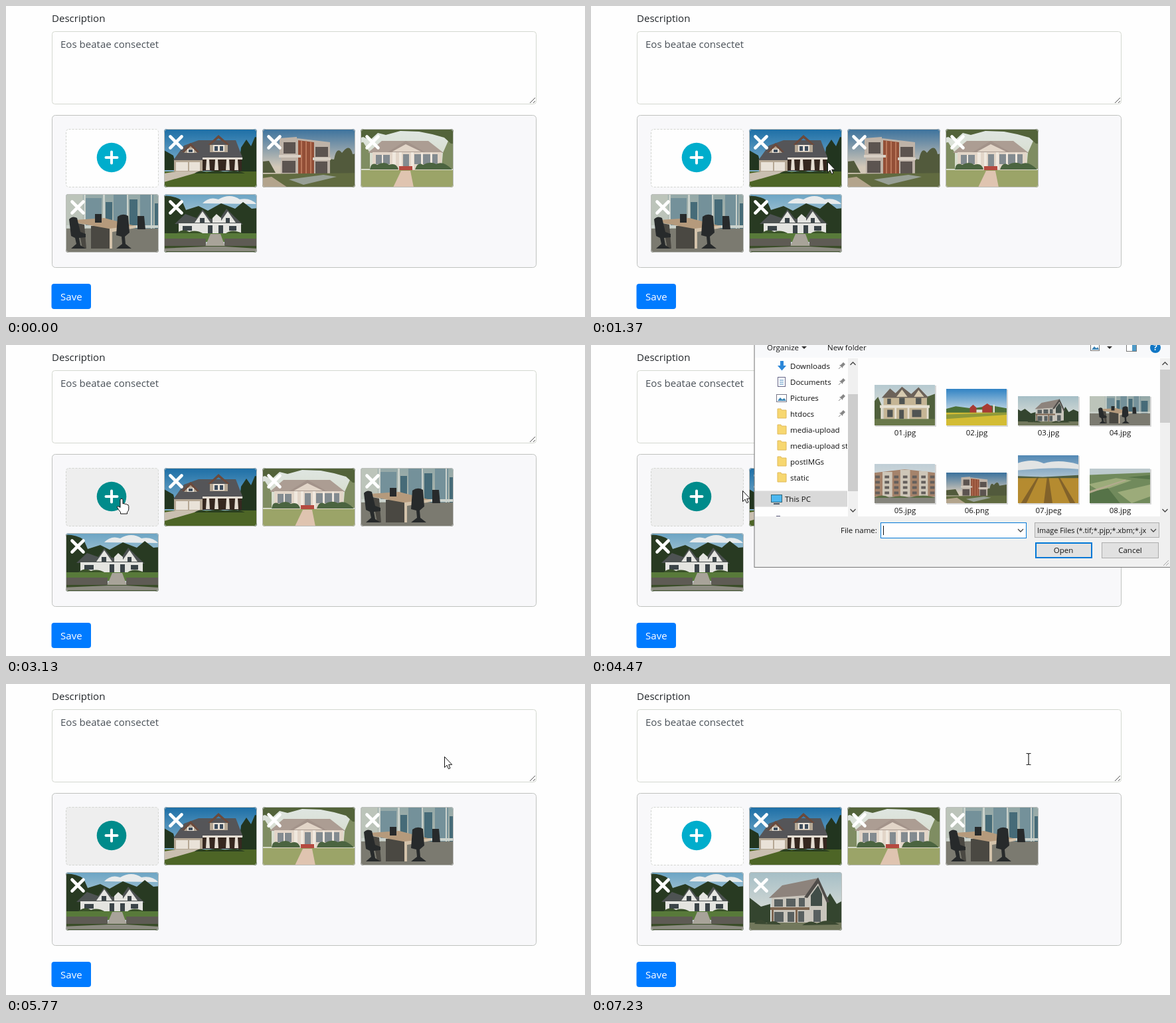
Animation, 872 px wide and 468 px high, one loop 7260 ms. Source, as an HTML page:

```html
<!DOCTYPE html>
<html lang="en">
<head>
<meta charset="utf-8">
<title>Media upload</title>
<style>
html, body { margin: 0; width: 100%; height: 100%; overflow: hidden; background: #fefefe; }
svg { display: block; }
#stage { width: 872px; height: 468px; }
text { font: 15.05px "Open Sans", "Noto Sans", sans-serif; fill: #212529; white-space: pre; }
#dialog text { font-size: 11.5px; fill: #111; }
#dialog .filter { font-size: 10.9px; }
</style>
</head>
<body>
<svg id="stage" viewBox="0 0 872 468" xmlns="http://www.w3.org/2000/svg">
  <defs id="defs">
    <clipPath id="round"><rect width="140" height="88" rx="4"/></clipPath>
    <clipPath id="side"><rect x="247" y="20" width="139" height="238"/></clipPath>
    <clipPath id="type"><rect x="668" y="267" width="168" height="24"/></clipPath>
  </defs>
  <rect width="872" height="468" fill="#fefefe"/>
  <text x="69" y="24">Description</text>
  <rect x="69.5" y="38.5" width="729" height="109" rx="4" fill="#fefefe" stroke="#d4d8d0"/>
  <text x="82" y="63" style="fill:#495057">Eos beatae consectet</text>
  <path d="M789 146l8-8M794 146l3-3" stroke="#555"/>
  <rect x="69.5" y="164.5" width="729" height="229" rx="5" fill="#f8f8fa" stroke="#bfc2bf"/>
  <g id="tiles"></g>
  <g id="loader" fill="#007db2"></g>
  <rect x="68.5" y="418" width="59.5" height="38" rx="4" fill="#007bff"/>
  <text x="82" y="443" style="fill:#fff">Save</text>
  <g id="dialog"></g>
  <g id="cursor">
    <path id="arrow" d="M.5.5V16.6L4.1 13.2 6.5 18.7 9 17.6 6.7 12.3H11.7Z" fill="#fff" stroke="#111"/>
    <path id="hand" d="M-2 1.5Q0-1.5 2 1.5V8Q4 6.6 5.2 8.6 7 7.4 8.2 9.4 10.5 8.6 10.8 11.5V16Q10.5 19 8.5 20.5V23H-1.5V20.5Q-5 16.5-6.6 13.3-6.5 10-2 13.5Z" fill="#fff" stroke="#111"/>
    <path id="beam" d="M-3.5-8.5H-1L0-7.5 1-8.5H3.5M0-7.5V7.5M-3.5 8.5H-1L0 7.5 1 8.5H3.5" fill="none" stroke="#222" stroke-width="1.2"/>
  </g>
</svg>
<script>
const LOOP = 7260;
const $ = id => document.getElementById(id);
const rect = (x, y, w, h, fill, extra = '') =>
  `<rect x="${x}" y="${y}" width="${w}" height="${h}" fill="${fill}" ${extra}/>`;
const path = (d, fill, extra = '') => `<path d="${d}" fill="${fill}" ${extra}/>`;
const line = (d, color, width = 1) => path(d, 'none', `stroke="${color}" stroke-width="${width}"`);
const label = (x, y, s, extra = '') => `<text x="${x}" y="${y}" ${extra}>${s}</text>`;
const clamp = v => Math.max(0, Math.min(1, v));
const smooth = v => { v = clamp(v); return v * v * (3 - 2 * v); };

// Each scene: sky colours, then [fill, path] layers in a box 88 high centred on x = 70.
const scenes = {
  gabled: ['#1c6ea6', '#7fb0cc', [
    ['#22351f', 'M-30 42L0 32 14 40 20 62H-30ZM112 62L116 28 124 16 131 26 137 12 170 20V64H112Z'],
    ['#555558', 'M14 47L30 25 52 17H108L119 45 62 47Z'],
    ['#b5a794', 'M15 47H58V64H15ZM30 36L40 25 50 36ZM69 24H96V35H69Z'],
    ['#6b4a3c', 'M27 35L40 21 53 35 50 35 40 26 30 35ZM66 24L82 9 99 24 95 24 82 14 70 24Z'],
    ['#e9e2d8', 'M18 50H36V63H18ZM38 50H54V63H38ZM35 30H45V36H35ZM74 24H91V34H74Z'],
    ['#3c4c5c', 'M37 31H43V35H37ZM76 26H81V33H76ZM84 26H89V33H84Z'],
    ['#35271f', 'M58 45H117V63H58Z'],
    ['#e5ddd2', 'M58 43H118V46H58ZM64 46H68L69 62H63ZM77 46H81L82 62H76ZM94 46H98L99 62H93ZM107 46H111L112 62H106Z'],
    ['#4d6526', 'M-30 64H170V88H-30Z'],
    ['#c9bfb0', 'M18 64H55L42 68 0 80H-30V72Z'],
    ['#2a3f1f', 'M46 67Q56 60 64 66 78 60 92 65 108 60 122 67Z']]],
  modern: ['#3a719d', '#d3c8b8', [
    ['#525a3c', 'M-30 52L10 48 20 66H-30ZM96 64Q97 42 108 46 112 25 120 36 132 20 136 38L170 32V68H96Z'],
    ['#beb3a8', 'M26 14L52 12V42H26ZM52 14L102 20V70H52ZM28 42H54V68H28Z'],
    ['#5c5450', 'M32 20H50V37H32ZM80 27H99V42H80ZM30 48H50V66H30ZM80 49H98V67H80Z'],
    ['#934f37', 'M54 17L78 20V68H54Z'],
    ['#b9775a', 'M58 18H60V67H58ZM65 18H67V67H65ZM72 19H74V67H72Z'],
    ['#d8cfc4', 'M25 39H58V43H25ZM76 43H103V47H76Z'],
    ['#616b40', 'M-30 68L170 66V88H-30Z'],
    ['#98a096', 'M40 76L92 69 112 72 62 84Z'],
    ['#b3a48c', 'M-30 78L14 72 38 88H-30Z']]],
  bungalow: ['#dfe6e2', '#d5dac8', [
    ['#7f8d62', 'M-30 26L4 20 14 36V60H-30ZM124 36L132 18 170 14V60H122Z'],
    ['#53633a', 'M-30 0H170V24L136 22 126 13 108 8 88 4 60 3 38 9 26 6 14 17 4 12-30 22Z'],
    ['#ac9d93', 'M11 36L32 18H102L125 36Z'],
    ['#e2d5c8', 'M18 35H122V62H18ZM42 34L68 19 96 34Z'],
    ['#a3938a', 'M40 35L68 18 98 35 93 35 68 23 46 35Z'],
    ['#838b90', 'M23 39H44V53H23ZM81 38H116V53H81ZM64 38H73V56H64Z'],
    ['#f0e8de', 'M48 35H53V60H48ZM58 35H62V60H58ZM76 35H80V60H76ZM91 36H94V58H91ZM105 36H108V58H105ZM32 39H34V55H32Z'],
    ['#4b6440', 'M14 61Q16 49 25 54 36 48 43 54 54 50 57 61ZM82 61Q86 49 94 54 105 48 114 53 124 47 138 61Z'],
    ['#b54a40', 'M58 56H78V63H58Z'],
    ['#9ba468', 'M-30 62H170V88H-30Z'],
    ['#dfc4b0', 'M61 63H75L80 88H49Z']]],
  office: ['#93a8a8', '#b3b8ab', [
    ['#bcc4ba', 'M-30 0H26V56H-30Z'],
    ['#74919a', 'M30 6H54V50H30ZM72 0H92V50H72ZM112 0H132V54H112Z'],
    ['#466b78', 'M96 8H108V52H96ZM60 12H70V46H60ZM134 14H154V52H134Z'],
    ['#cbd2cc', 'M27 0H30V52H27ZM56 0H59V52H56ZM92 0H94V52H92ZM128 0H130V54H128ZM-30 47H170V51H-30Z'],
    ['#7b7a70', 'M-30 52H170V88H-30Z'],
    ['#4a4842', 'M38 48H70V82H38ZM18 44L28 46 31 82H25Z'],
    ['#b59a7c', 'M14 39L58 36 105 48 70 53 20 44Z'],
    ['#d3c2aa', 'M66 52L106 47V51L70 57V82H66Z'],
    ['#272a2b', 'M5 38Q10 32 17 36L22 57 30 60V65L20 66 22 77 30 82H8L16 75 14 66 8 63ZM78 34Q86 28 94 33L96 58 89 64 90 75 99 82H76L85 75 84 64 76 62ZM108 33H118L120 53H108ZM44 30H54V43H44Z']]],
  villa: ['#6ba4c4', '#cbd8dc', [
    ['#e8ebec', 'M58 14Q68 3 82 8 99-2 114 8 130 5 139 15Z'],
    ['#283a22', 'M-30 8Q8-4 27 10L33 24 52 18 66 25 86 14 107 22 119 12 132 22 170 18V60H-30Z'],
    ['#4d5252', 'M16 45L32 30 49 36 58 23 69 37H84L94 22 106 34 119 46Z'],
    ['#e4e4e0', 'M22 44H116V60H22ZM46 43L58 26 70 43ZM84 43L96 26 108 43ZM73 36L79 30 86 36V43H73Z'],
    ['#3b4448', 'M54 36H61V43H54ZM93 36H99V43H93ZM28 48H42V55H28ZM66 47H73V60H66ZM82 47H89V60H82ZM98 48H109V55H98Z'],
    ['#3a5229', 'M18 60Q28 51 38 57 48 53 60 60ZM92 60Q102 51 120 60Z'],
    ['#587a3a', 'M-30 59H170V72H-30Z'],
    ['#5e5b54', 'M-30 67H63V78H-30ZM91 67H170V78H91Z'],
    ['#a8a399', 'M70 60H85L92 79H62Z'],
    ['#3a4d28', 'M-30 78H170V88H-30Z'],
    ['#8d8c82', 'M-30 83L63 79H92L170 84V86H-30Z']]],
  chalet: ['#a5bec6', '#d3d9d5', [
    ['#34452f', 'M-30 34L-12 45 0 38 18 52 32 48V88H-30ZM112 88V48L122 32 132 48 146 40 170 50V88Z'],
    ['#c9c5bc', 'M34 35H91V77H34ZM88 35L105 14 117 44V76H88Z'],
    ['#8d837c', 'M30 39L50 20 104 9 86 35Z'],
    ['#504d4a', 'M83 38L104 8 121 45 117 46 104 17 88 39Z'],
    ['#414d48', 'M93 35L104 20 110 33V51H93Z'],
    ['#596060', 'M38 41H51V52H38ZM56 40H70V52H56ZM75 39H84V52H75ZM38 60H52V75H38ZM58 60H68V75H58ZM74 59H83V75H74ZM97 57H108V75H97Z'],
    ['#7d6550', 'M32 53H91V57H32ZM34 57H37V78H34ZM70 57H73V78H70Z'],
    ['#72785c', 'M-30 76H170V88H-30Z'],
    ['#3a4831', 'M8 78Q16 66 26 77 38 70 48 79ZM80 80Q94 70 102 78 116 68 136 79Z']]],
  victorian: ['#b5c9d0', '#dddfd8', [
    ['#50603c', 'M0 40L12 26 22 50V78H0ZM118 78V26L140 18V78Z'],
    ['#c5b595', 'M24 26H118V74H24Z'],
    ['#6c6259', 'M20 28L38 8 50 18 64 4 84 20 100 5 122 28Z'],
    ['#d6cab0', 'M52 26L64 10 76 26ZM90 26L100 11 112 26Z'],
    ['#505452', 'M32 30H40V42H32ZM58 28H70V42H58ZM94 28H106V42H94ZM32 54H44V70H32ZM58 54H68V74H58ZM86 54H106V70H86Z'],
    ['#e6e0d2', 'M16 44H124V50H16ZM18 48H22V75H18ZM48 48H52V75H48ZM76 48H80V75H76ZM118 48H122V75H118Z'],
    ['#69784a', 'M0 74H140V88H0Z']]],
  barn: ['#3183c4', '#cddde6', [
    ['#4b7038', 'M-10 50L20 42 60 47 105 40 150 48V62H-10Z'],
    ['#a83a34', 'M54 57V45L62 38 70 45V57ZM84 57V43L96 35 108 43V57Z'],
    ['#e0ddd5', 'M70 50H84V57H70ZM110 38H114V57H110Z'],
    ['#d3bc34', 'M-10 57H150V88H-10Z'],
    ['#8f9a3a', 'M-10 62L150 57V62L-10 73Z']]],
  flats: ['#bfced6', '#e0e1dc', [
    ['#a5836b', 'M0 20L70 12 140 20V74H0Z'],
    ['#cec6b8', 'M20 18H42V74H20ZM60 13H82V74H60ZM102 16H122V74H102Z'],
    ['#645f5c', [0, 1, 2, 3].map(r => [4, 25, 46, 66, 87, 107, 127].map(x => `M${x} ${26 + r * 12}h10v6h-10Z`).join('')).join('')],
    ['#85847c', 'M0 74H140V88H0Z'],
    ['#586b42', 'M0 76Q20 66 36 76 62 68 80 76 112 66 140 76Z']]],
  wheat: ['#5288b4', '#d0d8da', [
    ['#e2e4e4', 'M10 16Q40 4 62 15 92 6 130 18V26Q90 20 10 28Z'],
    ['#b58b30', 'M10 40H130V88H10Z'],
    ['#82622a', 'M68 40H71L78 88H62ZM50 40H53L30 88H20ZM88 40H91L120 88H110Z'],
    ['#505e40', 'M10 38L60 40 130 36V42H10Z']]],
  fields: ['#bdcace', '#bdcace', [
    ['#718a5c', 'M-10 16L150 10V88H-10Z'],
    ['#9cab7a', 'M-10 40L60 24 100 30 20 58ZM64 60L150 40V70L100 88Z'],
    ['#567348', 'M-10 60L40 50 70 88H-10ZM90 22L150 16V28Z'],
    ['#b5ab90', 'M-10 58L84 28 86 30-10 64Z']]]
};

$('defs').innerHTML += Object.entries(scenes).map(([name, [top, low, layers]]) =>
  `<linearGradient id="${name}-sky" x2="0" y2="1"><stop stop-color="${top}"/><stop offset=".65" stop-color="${low}"/></linearGradient>
   <g id="${name}">${rect(-30, 0, 200, 88, `url(#${name}-sky)`)}${layers.map(([fill, d]) => path(d, fill)).join('')}</g>`).join('');

const slot = i => `translate(${90 + i % 4 * 148} ${185 + (i >> 2) * 98})`;
const photos = ['gabled', 'modern', 'bungalow', 'office', 'villa', 'chalet'];
$('tiles').innerHTML = `<g transform="${slot(0)}">
  <rect id="add" x=".5" y=".5" width="139" height="87" rx="4" stroke="#d2d4d0" stroke-dasharray="3 2"/>
  <circle id="disc" cx="69" cy="43" r="22.3"/>
  <path d="M60.5 43h17M69 34.5v17" stroke="#fff" stroke-width="4" stroke-linecap="round"/></g>` +
  photos.map(name => `<g id="tile-${name}"><g clip-path="url(#round)"><use href="#${name}"/></g>
    <rect x=".5" y=".5" width="139" height="87" rx="4" fill="none" stroke="#bcbebb"/>
    <path d="M9.5 11.5l17 17m0-17l-17 17" stroke="#fff" stroke-width="4.6" stroke-linecap="round"/></g>`).join('');
$('loader').innerHTML = [0, 1, 2].map(i => rect(417.5 + i * 13.5, 0, 5, 10, '#007db2')).join('');

const FACE = '#f0f0f0', THUMB = '#cdcdcd', BUTTON = '#e1e1e1', EDGE = 'stroke="#adadad"', BLUE = 'stroke="#0078d7"';
const chevron = (x, y, dir, size = 4) =>
  line(`M${x - size} ${y - dir * 2}l${size} ${dir * size} ${size} ${-dir * size}`, '#444', 1.3);
const folder = y => path(`M281 ${y - 7}h5l1 2h7v12h-13Z`, '#f7d770', 'stroke="#e0b95a"');
const pin = y => path(`M376 ${y - 1}l4-4 3 3-4 4 0 2-5-5Z`, '#868686') + line(`M376 ${y + 2}l-3 3`, '#868686');
const scrollbar = (x, top, h) =>
  rect(x, 20, 15, 238, FACE) + rect(x, top, 15, h, THUMB) + chevron(x + 7.5, 28, -1) + chevron(x + 7.5, 249, 1);

function thumb(name, file, i, h) {
  const x = 427 + i % 4 * 108, bottom = i < 4 ? 121 : 238, w = 88 * 91 / h;
  return rect(x + 1, bottom - h + 1, 92, h + 1, '#d8d8d8') +
    `<svg x="${x}" y="${bottom - h}" width="91" height="${h}" viewBox="${70 - w / 2} 0 ${w} 88" preserveAspectRatio="none"><use href="#${name}"/></svg>` +
    label(x + 46, bottom + 15, file, 'text-anchor="middle"');
}

function buildDialog() {
  const places = ['Downloads', 'Documents', 'Pictures', 'htdocs', 'media-upload', 'media-upload storage', 'postIMGs', 'static'];
  const files = [['victorian', '01.jpg', 61], ['barn', '02.jpg', 55], ['chalet', '03.jpg', 44], ['office', '04.jpg', 44],
    ['flats', '05.jpg', 59], ['modern', '06.png', 46], ['wheat', '07.jpeg', 72], ['fields', '08.jpg', 52]];
  return rect(246, -5, 640, 339.5, FACE, 'stroke="#777"') +
    rect(247, 0, 625, 19, '#f8f9fb') + rect(247, 19, 625, 239, '#fefefe') +
    label(265, 8, 'Organize') + path('M317 2h8l-4 4Z', '#333') + label(356, 8, 'New folder') +
    rect(752.5, -2.5, 13, 11, '#fff', 'stroke="#777"') + path('M754 7l4-5 3 3 2-2 2 4Z', '#3b83b5') +
    path('M777 2h8l-4 4Z', '#333') +
    rect(806.5, -2.5, 15, 12, '#fff', 'stroke="#777"') + rect(815, -2, 6, 11, '#4e9ac7') +
    '<circle cx="850" cy="4" r="8" fill="#1177c5"/>' +
    label(850, 8, '?', 'text-anchor="middle" style="fill:#fff;font-weight:700"') +
    rect(247, 219.5, 139, 24, '#d9d9d9') +
    `<g clip-path="url(#side)">${places.map((s, i) => label(300, 36 + i * 24, s)).join('')}${label(292, 236, 'This PC')}</g>` +
    [0, 1, 2, 3].map(i => pin(31 + i * 24)).join('') +
    [3, 4, 5, 6, 7].map(i => folder(31 + i * 24)).join('') +
    path('M285 24h5v7h4l-6.5 7.5-6.5-7.5h4Z', '#2b87d8') +
    rect(281.5, 48.5, 11, 14, '#fff', 'stroke="#668"') + line('M284 53h6m-6 3h6m-6 3h6', '#4a8bc0') +
    rect(279.5, 74.5, 15, 11, '#fff', 'stroke="#778"') + path('M281 84l4-5 3 3 3-2 3 4Z', '#3c86b4') +
    rect(271.5, 225.5, 16, 11, '#4db8f0', 'stroke="#367"') + line('M275 239h9', '#456', 2) +
    line('M279 257.5h6', '#557') +
    scrollbar(387, 74, 146) + scrollbar(857, 37, 80) +
    '<rect id="pick" x="636" y="24" width="106" height="120"/>' +
    files.map(([name, file, h], i) => thumb(name, file, i, h)).join('') +
    label(376, 283, 'File name:') +
    rect(436.5, 267.5, 219, 23, '#fefefe', BLUE) + chevron(647, 279, 1) +
    '<text id="field" x="440" y="283"></text><path id="caret" d="M440.5 272v14" stroke="#111"/>' +
    rect(668.5, 267.5, 187, 22, BUTTON, EDGE) +
    `<g clip-path="url(#type)">${label(672, 283, 'Image Files (*.tif;*.pjp;*.xbm;*.jxl', 'class="filter"')}</g>` + chevron(847, 279, 1) +
    rect(670, 298, 84, 22, BUTTON, BLUE + ' stroke-width="2"') + label(711.5, 313, 'Open', 'text-anchor="middle"') +
    rect(769.5, 297.5, 85, 23, BUTTON, EDGE) + label(812, 313, 'Cancel', 'text-anchor="middle"') +
    line('M862 332l8-8m-4 8l4-4', '#a5a5a5');
}
$('dialog').innerHTML = buildDialog();

// time, x, y of the pointer hot spot
const route = [[200, -14, 425], [770, 150, 345], [1370, 356, 234], [1480, 402, 207], [2430, 402, 207], [3100, 174, 231],
  [4200, 174, 231], [4470, 228, 219], [5300, 658, 112], [5400, 660, 109], [5900, 660, 109], [6370, 656, 114], [6660, 659, 113], [LOOP, 659, 113]];

function pointer(t) {
  const n = Math.max(1, route.findIndex(p => p[0] > t));
  const [a, b] = [route[n - 1], route[n]];
  const k = smooth((t - a[0]) / (b[0] - a[0]));
  return [a[1] + (b[1] - a[1]) * k, a[2] + (b[2] - a[2]) * k];
}

const mix = (a, b, k) => `rgb(${a.map((v, i) => Math.round(v + (b[i] - v) * k))})`;
const show = (id, on) => $(id).setAttribute('display', on ? 'inline' : 'none');
const set = (id, name, value) => $(id).setAttribute(name, value);

function render(t) {
  const loading = t >= 5880 && t < 6640;
  const hover = t < 5000 ? smooth((t - 2900) / 180) : 1 - smooth((t - 5880) / 200);
  set('add', 'fill', mix([254, 254, 254], [238, 238, 238], hover));
  set('disc', 'fill', mix([0, 173, 204], [0, 139, 139], hover));

  let place = 1;
  for (const name of photos) {
    const on = name === 'modern' ? t < 2000 : name === 'chalet' ? t >= 5880 : true;
    show('tile-' + name, on);
    if (on) set('tile-' + name, 'transform', slot(place++));
  }
  set('tiles', 'opacity', loading ? .6 : 1);

  show('loader', loading);
  [...$('loader').children].forEach((bar, i) => {
    const h = 10 + 16 * Math.max(0, Math.cos((t - 6370) / 800 * 2 * Math.PI - i * 1.19));
    bar.setAttribute('y', 280 - h / 2);
    bar.setAttribute('height', h);
  });

  const [x, y] = pointer(t), picked = t >= 5430;
  show('dialog', t >= 3970 && t < 5600);
  set('dialog', 'opacity', smooth((t - 3940) / 150));
  set('pick', 'fill', picked ? '#cce8ff' : x > 636 && y < 144 ? '#e5f3ff' : 'none');
  $('field').textContent = picked ? '03.jpg' : '';
  show('caret', !picked);

  const hand = t >= 1450 && t < 2460 || t >= 2900 && t < 4000;
  const beam = t >= 5880;
  show('cursor', t >= 200);
  show('hand', hand);
  show('beam', beam);
  show('arrow', !hand && !beam);
  set('cursor', 'transform', `translate(${Math.round(x)} ${Math.round(y)})`);
}

const start = performance.now();
function tick() {
  render((performance.now() - start) % LOOP);
  requestAnimationFrame(tick);
}
tick();
</script>
</body>
</html>
```
